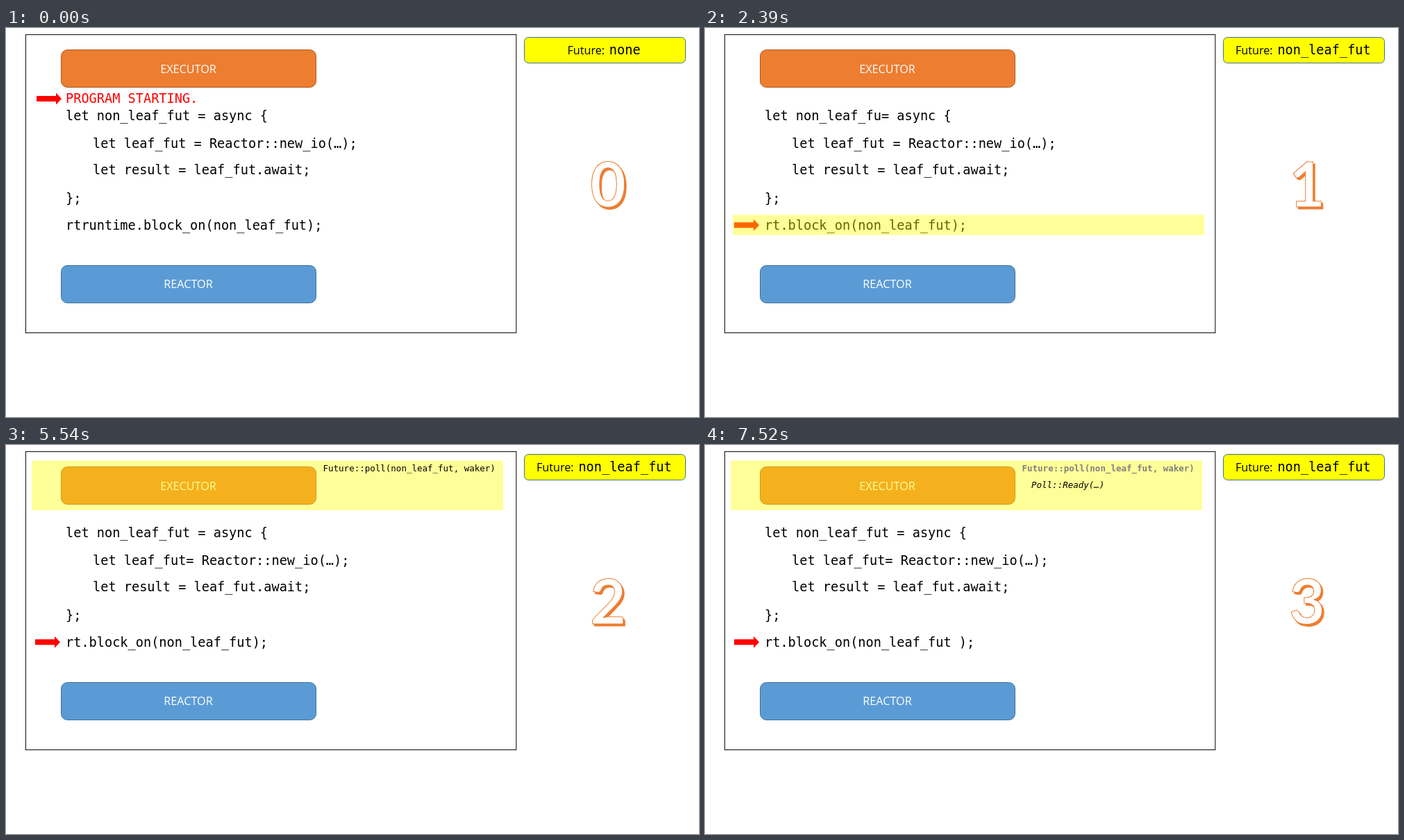
These frames come from a looping animation (998x561 px, 8000 ms). An HTML page:

```html
<!DOCTYPE html>
<html lang="en">
<head>
<meta charset="utf-8">
<title>Executor and reactor</title>
<style>
  html, body { margin: 0; width: 100%; height: 100%; overflow: hidden; background: #fff; }
  svg { display: block; width: 100vw; height: 100vh; }
  text { white-space: pre; }
  .code { font: 18.6px "DejaVu Sans Mono", monospace; }
  .note { font: 12.5px "DejaVu Sans Mono", monospace; }
  .note.done { font-weight: 700; fill: #7f7f7f; }
  .note.result { font-style: italic; }
  .label { font: 16.2px "Open Sans", sans-serif; }
  .title { fill: #fff; text-anchor: middle; }
  .digit { font: 700 89px Lato, sans-serif; text-anchor: middle; stroke: #ed7d31; }
</style>
</head>
<body>
<svg viewBox="0 0 998 561">
  <rect x="28.4" y="9.6" width="706.4" height="430" fill="#fff" stroke="#000"/>
  <rect x="79.5" y="31.5" width="367" height="54" rx="9" fill="#ed7d31" stroke="#ae5a21"/>
  <text class="label title" x="262.5" y="65">EXECUTOR</text>
  <rect x="79.5" y="342.5" width="367" height="54" rx="9" fill="#5b9bd5" stroke="#41719c"/>
  <text class="label title" x="262.5" y="375">REACTOR</text>
  <rect x="746.5" y="13.5" width="232" height="37" rx="6" fill="#ff0" stroke="#41719c"/>

  <text class="label" id="futureLabel" y="38">Future:</text>
  <text class="code" id="futureName" y="37.5"></text>

  <text class="code" id="start" x="86" y="108" fill="#f00">PROGRAM STARTING.</text>
  <text class="code" id="outer" x="86" y="132.5"></text>
  <text class="code" id="inner" x="125" y="172.7"></text>
  <text class="code" x="125" y="211">let result = leaf_fut.await;</text>
  <text class="code" x="86" y="252">};</text>
  <text class="code" id="block" x="86" y="290.5"></text>

  <path id="arrow" d="M0 -4H28V-8.5L36 0L28 8.5V4H0Z" fill="#f00"/>
  <rect id="glow" fill="#ff0" fill-opacity=".4"/>
  <text class="note" id="poll" x="456.5" y="38">Future::poll(non_leaf_fut, waker)</text>
  <text class="note result" id="ready" x="470" y="61.5">Poll::Ready(…)</text>

  <text class="digit" id="shade" x="869.5" y="260.5" fill="#ed7d31"></text>
  <text class="digit" id="digit" x="867" y="258.2" fill="#fff"></text>
</svg>
<script>
  const LOOP = 8000;
  const $ = id => document.getElementById(id);

  const base = {
    future: "non_leaf_fut", futureX: 764, nameX: 824.4,
    outer: "let non_leaf_fut = async {",
    inner: "let leaf_fut= Reactor::new_io(…);",
    block: "rt.block_on(non_leaf_fut);",
    arrow: [42, 284.3],
    glow: [37, 22.5, 679, 71.5],
    poll: true, ready: false
  };

  const steps = [
    { ...base, at: 0, start: true, future: "none", futureX: 808.5, nameX: 868.8,
      inner: "let leaf_fut = Reactor::new_io(…);",
      block: "rtruntime.block_on(non_leaf_fut);",
      arrow: [44, 102], glow: null, poll: false },
    { ...base, at: 500,
      outer: "let non_leaf_fu= async {",
      inner: "let leaf_fut = Reactor::new_io(…);",
      glow: [40, 269.5, 679, 29], poll: false },
    { ...base, at: 3650 },
    { ...base, at: 6800, block: "rt.block_on(non_leaf_fut );", ready: true }
  ];

  const show = (id, on) => $(id).setAttribute("visibility", on ? "visible" : "hidden");
  const set = (id, attrs) => {
    for (const key in attrs) $(id).setAttribute(key, attrs[key]);
  };

  function draw(index) {
    const s = steps[index];
    for (const id of ["outer", "inner", "block"]) $(id).textContent = s[id];
    $("futureName").textContent = s.future;
    $("digit").textContent = $("shade").textContent = index;
    set("futureLabel", { x: s.futureX });
    set("futureName", { x: s.nameX });
    set("arrow", { transform: `translate(${s.arrow})` });
    for (const id of ["start", "glow", "poll", "ready"]) show(id, s[id]);
    if (s.glow) {
      const [x, y, width, height] = s.glow;
      set("glow", { x, y, width, height });
    }
    $("poll").classList.toggle("done", s.ready);
  }

  let shown = 0;
  const begin = performance.now();
  draw(0);

  function tick() {
    const t = (performance.now() - begin) % LOOP;
    const index = steps.filter(s => s.at <= t).length - 1;
    if (index !== shown) draw(shown = index);
    requestAnimationFrame(tick);
  }
  requestAnimationFrame(tick);
</script>
</body>
</html>
```
